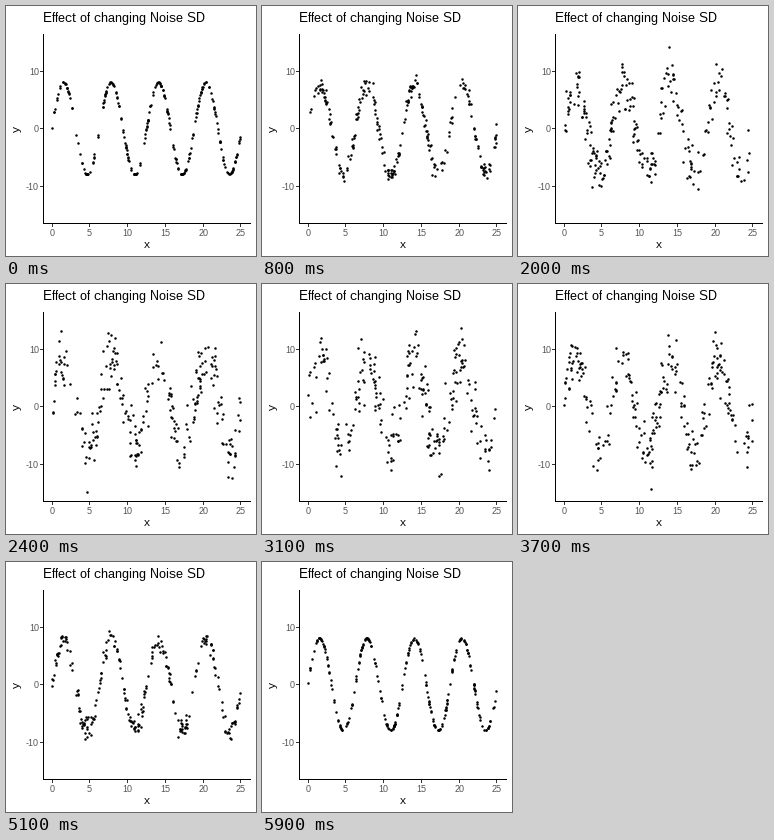
These frames come from a looping animation (250 by 250 pixels, 6000 ms). A matplotlib script:

```python
import numpy as np
import matplotlib.pyplot as plt
from matplotlib.animation import FuncAnimation

SIZE, DPI = 250, 100
FRAMES, INTERVAL = 60, 100
POINTS, AMPLITUDE, MAX_SD, Y_LIMIT = 250, 8, 3, 15

# Full hinting gives the crisp, narrow letters of small screen text
plt.rcParams.update({
    "font.family": "Liberation Sans",
    "text.hinting": "native",
    "text.hinting_factor": 1,
})


def px(value):
    """Convert pixels to points."""
    return value * 72 / DPI


def to_x(x):
    return 46.1 + 7.55 * np.asarray(x)


def to_y(y):
    return 122.9 - 5.76 * np.asarray(y)


def snap(value):
    """Centre of the pixel that holds the value."""
    return np.floor(value) + 0.5


fig = plt.figure(figsize=(SIZE / DPI, SIZE / DPI), dpi=DPI, facecolor="white")
ax = fig.add_axes([0, 0, 1, 1])
ax.set(xlim=(0, SIZE), ylim=(SIZE, 0))
ax.axis("off")


def line(xs, ys, color):
    ax.plot(xs, ys, color=color, lw=px(1), solid_capstyle="butt", snap=False)


def label(x, y, text, size, color="black", ha="center", rotation=0):
    ax.text(x, y, text, fontsize=px(size), color=color, ha=ha,
            va="baseline", rotation=rotation, rotation_mode="anchor")


# Axes, ticks and labels
for tick in range(0, 26, 5):
    x = snap(to_x(tick))
    line([x, x], [218, 221], "#333333")
    label(x, 230, str(tick), 9, "#4d4d4d")
for tick in (-10, 0, 10):
    y = snap(to_y(tick))
    line([34, 37], [y, y], "#333333")
    label(33, y + 3.5, str(tick), 9, "#4d4d4d", ha="right")
line([37.5, 37.5], [28, 218], "black")
line([37, 245], [217.5, 217.5], "black")

label(37, 16, "Effect of changing Noise SD", 13, ha="left")
label(141, 242, "x", 11)
label(14, 123, "y", 11, rotation=90)

# Two line widths keep the dots exactly where they are placed
dots = ax.scatter([], [], s=px(2.5) ** 2, color="black", linewidths=[0, 0])

# The noise rises to its maximum and falls back to zero
rise = np.linspace(0, MAX_SD, FRAMES // 2)
noise_sd = np.concatenate([rise, rise[::-1]])


def update(frame):
    rng = np.random.default_rng(100 + frame)
    x = rng.uniform(0, 25, POINTS)
    y = AMPLITUDE * np.sin(x) + rng.normal(0, 1, POINTS) * noise_sd[frame]
    inside = np.abs(y) <= Y_LIMIT
    dots.set_offsets(np.column_stack([snap(to_x(x[inside])),
                                      snap(to_y(y[inside]))]))
    return (dots,)


anim = FuncAnimation(fig, update, frames=FRAMES, interval=INTERVAL,
                     repeat=True, repeat_delay=0)
plt.show()
```
